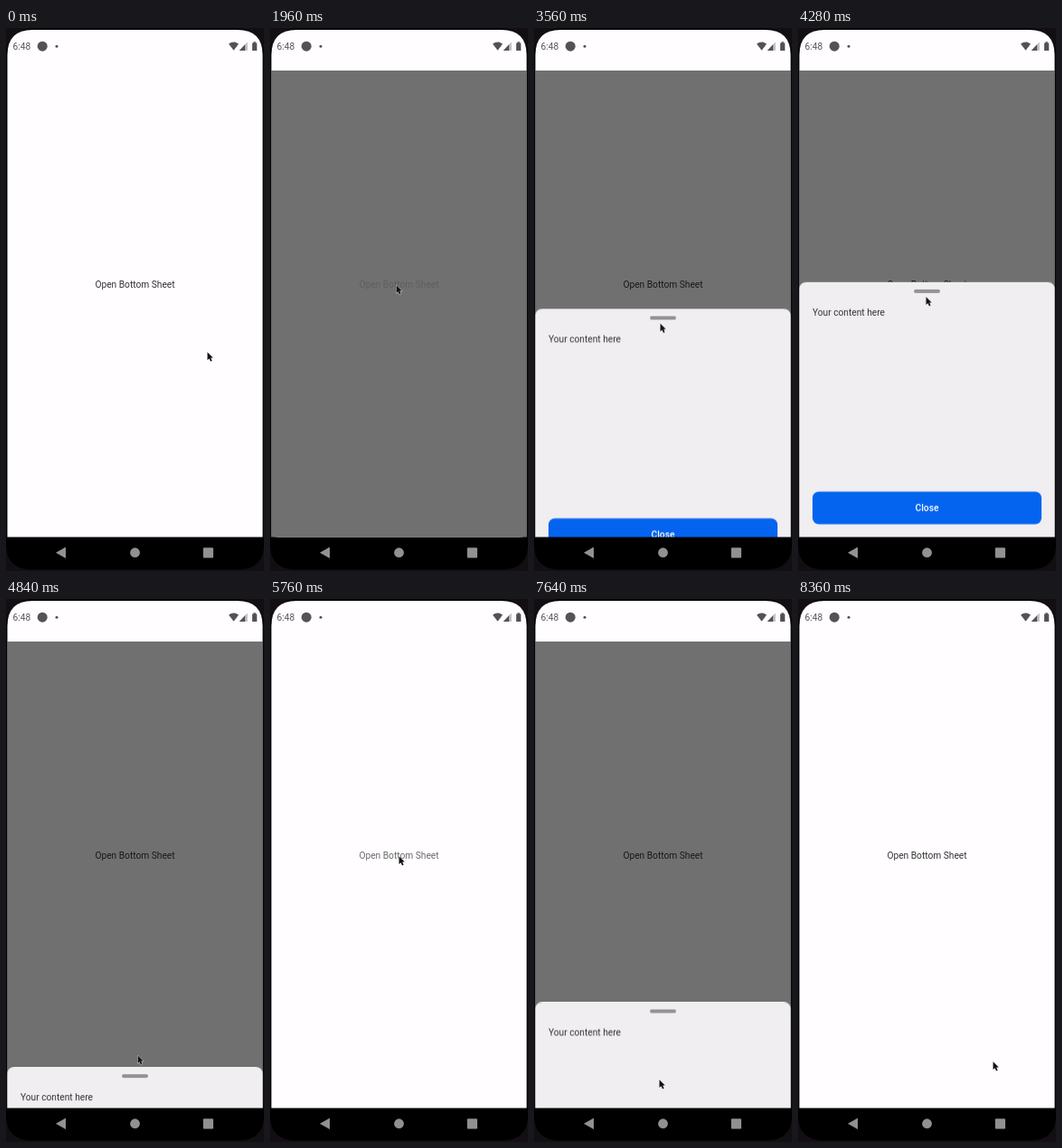
Recreate the animation shown at these times as an HTML page. Size 285 px wide and 600 px high, loop 8400 ms.

```html
<!DOCTYPE html>
<html lang="en">
<head>
<meta charset="utf-8">
<title>Bottom sheet</title>
<style>
  html, body { margin: 0; width: 100%; height: 100%; overflow: hidden; background: #130e12; }
  svg { display: block; width: 100vw; height: 100vh; overflow: hidden; }
  text { font: 10.2px Roboto, sans-serif; fill: #333; }
  .mid { text-anchor: middle; }
  .status { fill: #545255; }
  .nav { fill: #929092; }

  /* One shared 8.4 s clock: 1% = 84 ms */
  #cursor, #sheet, #backdrop, #open, #close { animation: 8400ms linear infinite; }
  #cursor { animation-name: cursor; }
  #sheet { animation-name: sheet; }
  #backdrop { animation-name: backdrop; animation-timing-function: step-end; }
  #open { animation-name: open; }
  #close { animation-name: close; }

  @keyframes cursor {
    0% { transform: translate(222px, 358px); animation-timing-function: ease-in-out; }
    9.05%, 17.14% { transform: translate(149px, 284px); }
    19.52%, 26.67% { transform: translate(139px, 284px); }
    33.8% { transform: translate(139px, 293px); }
    38.57% { transform: translate(139px, 293px); animation-timing-function: ease-in; }
    42.38% { transform: translate(139px, 326px); animation-timing-function: ease-out; }
    45.71% { transform: translate(139px, 376px); animation-timing-function: ease-in-out; }
    51.9%, 54.76% { transform: translate(141px, 293px); }
    56.19% { transform: translate(142px, 356px); }
    57.14% { transform: translate(144px, 466px); }
    57.62% { transform: translate(145px, 504px); }
    58.1% { transform: translate(145px, 510px); }
    59.52% { transform: translate(145px, 510px); animation-timing-function: ease-in-out; }
    68.1% { transform: translate(142px, 284px); }
    75.24% { transform: translate(142px, 284px); animation-timing-function: ease-in-out; }
    87.62%, 98.1% { transform: translate(138px, 531px); }
    99.52%, 100% { transform: translate(215px, 511px); }
  }

  @keyframes sheet {
    0% { transform: translateY(564px); }
    23.333%, 72.857% {
      transform: translateY(564px);
      animation-timing-function: linear(0, .294, .636, .834, .929, .971, .989, .996, 1);
    }
    27.143% { transform: translateY(277px); }
    38.57% { transform: translateY(277px); animation-timing-function: ease-in; }
    42.38% { transform: translateY(310px); animation-timing-function: ease-out; }
    45.71% { transform: translateY(360px); animation-timing-function: ease-in-out; }
    51.9%, 54.76% { transform: translateY(277px); }
    56.19% { transform: translateY(340px); }
    57.14% { transform: translateY(450px); }
    57.62% { transform: translateY(516px); }
    58.1% { transform: translateY(564px); }
    76.667% { transform: translateY(277px); }
    90% { transform: translateY(277px); animation-timing-function: ease-in; }
    90.952% { transform: translateY(443px); }
    91.548%, 100% { transform: translateY(564px); }
  }

  @keyframes backdrop {
    0%, 59.881%, 92.738%, 100% { opacity: 0; }
    23.214%, 72.738% { opacity: 1; }
  }

  @keyframes open {
    0%, 17.14%, 26.31%, 67.86%, 75.83%, 100% { opacity: 1; }
    19.52%, 23.33%, 70%, 72.857% { opacity: .2; }
  }

  @keyframes close {
    0%, 88.1% { opacity: 1; }
    90%, 91.5% { opacity: .2; }
    92%, 100% { opacity: 1; }
  }
</style>
</head>
<body>
<svg viewBox="0 0 285 600">
  <rect width="285" height="600" fill="#130e12"/>
  <rect x="0" y="0.5" width="285" height="598" rx="29"/>
  <path d="M1.5 563V30Q1.5 2 29.5 2H255.5Q283.5 2 283.5 30V563Z" fill="#fffdff"/>

  <g class="status">
    <text class="status" x="7.6" y="24.2">6:48</text>
    <circle cx="40.2" cy="20.2" r="5.5"/>
    <circle cx="56" cy="20.2" r="1.5"/>
    <path d="M246 17.6Q251.5 13.4 257 17.6L251.5 24.8Z"/>
    <path d="M266.7 15.5V25H257.7Z" opacity=".4"/>
    <path d="M264 18.3V25H257.7Z"/>
    <path d="M272 16.5H273.4V15.3H275.8V16.5H277.2V25H272Z"/>
  </g>

  <text id="open" class="mid" x="142.5" y="286.7">Open Bottom Sheet</text>
  <rect id="backdrop" x="1.5" y="47" width="282" height="516" fill="#000" fill-opacity=".555"/>

  <g id="sheet">
    <path d="M1.5 286V8Q1.5 0 9.5 0H275.5Q283.5 0 283.5 8V286Z" fill="#f0eef1"/>
    <rect x="128" y="8" width="29" height="4" rx="2" fill="#959296"/>
    <text x="16" y="37.4">Your content here</text>
    <g id="close">
      <rect x="16" y="231.5" width="253" height="36" rx="7" fill="#0464ef"/>
      <text class="mid" x="142.5" y="253.2" style="fill:#fff;font-weight:500">Close</text>
    </g>
  </g>

  <path d="M0 563H285V600H0Z" fill="#130e12"/>
  <path d="M0 562.5H285V570Q285 598.5 256 598.5H29Q0 598.5 0 570Z"/>
  <g class="nav">
    <path d="M55 579.7L66 573.4V586Z"/>
    <circle cx="142.5" cy="579.7" r="5.4"/>
    <rect x="217.8" y="574.2" width="11.2" height="11.2" rx="1"/>
  </g>

  <g id="cursor">
    <path d="M.5 .3V9L2.5 7.2L4 10.5L5.6 9.8L4.2 6.6H6.8Z" fill="#111" stroke="#fff" stroke-width=".9" stroke-linejoin="round" paint-order="stroke"/>
  </g>
</svg>
</body>
</html>
```
